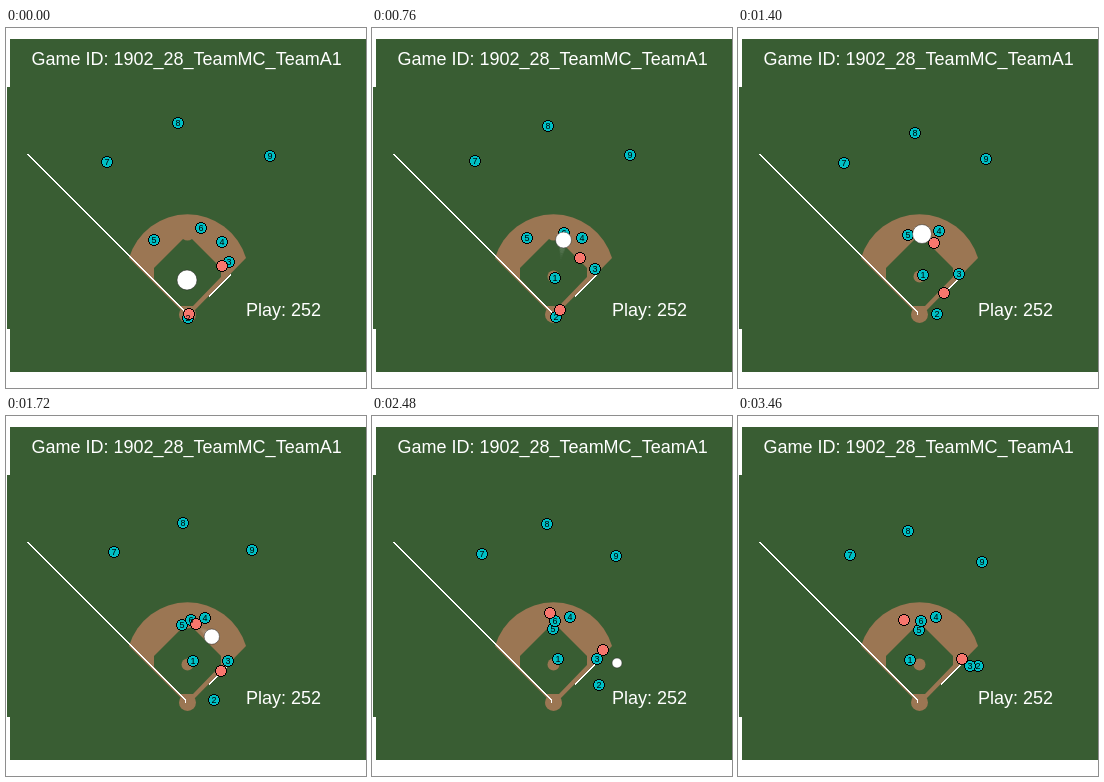
These frames come from a looping animation (360 by 360 pixels, 3480 ms). An HTML page:

```html
<!DOCTYPE html>
<html lang="en">
<head>
<meta charset="utf-8">
<title>Play 252</title>
<style>
  html, body { margin: 0; width: 100%; height: 100%; overflow: hidden; background: #fff; }
  svg { display: block; width: 100%; height: 100%; }
  text { font-family: "Liberation Sans", Arial, sans-serif; }
  .label { font-size: 18px; fill: #fff; }
  .num { font-size: 9px; text-anchor: middle; fill: #000; }
  .dot { stroke: #000; stroke-width: 1; shape-rendering: crispEdges; }
  .chalk { stroke: #fff; stroke-width: 1; fill: none; shape-rendering: crispEdges; }
</style>
</head>
<body>
<svg viewBox="0 0 360 360">
  <path fill="#395d33" d="M4 11H360V344H4V301H1V59H4Z"/>
  <g fill="#9b7653">
    <path d="M123 230A61 61 0 0 1 240 230L187 284H177Z"/>
    <path fill="#395d33" d="M148 240L177 211Q181.500 214 186 211L215 240V249L187 278H174L148 251Z"/>
    <circle cx="181.500" cy="248.500" r="6"/>
    <circle cx="181.500" cy="286.500" r="8.500"/>
  </g>
  <path class="chalk" d="M21.500 126L179 283.500V287M203 268.500L225 246.500"/>
  <g id="wake" fill="#fff"></g>
  <g id="dots"></g>
  <g id="nums"></g>
  <circle id="ball" fill="#fff" stroke="#222" stroke-width=".5"/>
  <text class="label" x="25.500" y="37">Game ID: 1902_28_TeamMC_TeamA1</text>
  <text class="label" x="240" y="288">Play: 252</text>
</svg>
<script>
const LOOP = 3480, STEP = 20, BALL_END = 3000, WAKE = 8;
const times = [0, 760, 1400, 2040, 2480, 2900, 3460];

// x,y at each time; a shorter track holds its last place
const tracks = {
  1: "181,250 183,250 185,247 188,244 186,243 180,244 172,244",
  2: "182,290 184,289 199,286 217,280 227,269 233,258 240,250",
  3: "223,234 223,241 221,246 223,244 225,243 230,246 232,250",
  4: "216,214 210,210 201,203 198,201",
  5: "148,212 155,210 170,207 180,211 181,213 181,214",
  6: "195,200 192,205 185,206 185,203 183,205 184,205 183,205",
  7: "101,134 103,133 106,135 109,137 110,138 111,138 112,139",
  8: "172,95 176,98 177,105 176,108 175,108 173,111 170,115",
  9: "264,128 258,127 248,131 245,137 244,140 244,143 244,146",
  runner: "216,238 208,230 196,215 185,202 178,197 172,198 166,204",
  batter: "183,286 188,282 206,265 223,245 231,234 230,235 224,243"
};

// time, x, y, radius
const flight = [
  [0, 181, 252, 10], [200, 181, 284, 7], [760, 191.5, 212, 8], [860, 192, 206, 8],
  [1400, 184, 206, 9.5], [1500, 185, 206, 9.5], [2040, 236, 242, 5],
  [2240, 253, 251, 4.5], [2480, 245, 247, 5], [2900, 235, 255, 3], [BALL_END, 236, 255, 3]
];

const $ = id => document.getElementById(id);

function add(parent, tag, cls) {
  const el = document.createElementNS("http://www.w3.org/2000/svg", tag);
  if (cls) el.setAttribute("class", cls);
  return parent.appendChild(el);
}

function set(el, attrs) {
  for (const k in attrs) el.setAttribute(k, attrs[k]);
}

const players = Object.entries(tracks).map(([name, track]) => {
  const keys = track.split(" ").map(p => p.split(",").map(Number));
  const fielder = name.length === 1;
  const dot = add($("dots"), "circle", "dot");
  set(dot, { r: 5.5, fill: fielder ? "#00bfc4" : "#f8766d" });
  const num = fielder ? add($("nums"), "text", "num") : null;
  if (num) num.textContent = name;
  return { keys, dot, num };
});

const ghosts = Array.from({ length: WAKE }, () => add($("wake"), "circle"));

function segment(list, t) {
  let i = 0;
  while (i < list.length - 2 && t >= list[i + 1]) i++;
  return i;
}

// smooth curve through the key places
function place(keys, t, axis) {
  const at = i => keys[Math.min(i, keys.length - 1)][axis];
  const last = times.length - 1;
  const slope = i => {
    const a = Math.max(i - 1, 0), b = Math.min(i + 1, last);
    return (at(b) - at(a)) / (times[b] - times[a]);
  };
  const i = segment(times, t), d = times[i + 1] - times[i];
  const u = Math.min((t - times[i]) / d, 1), v = 1 - u;
  return v * v * (1 + 2 * u) * at(i) + u * u * (3 - 2 * u) * at(i + 1)
    + d * u * v * (v * slope(i) - u * slope(i + 1));
}

function ballAt(t) {
  const i = segment(flight.map(k => k[0]), t);
  const a = flight[i], b = flight[i + 1];
  const u = (t - a[0]) / (b[0] - a[0]);
  return [1, 2, 3].map(n => a[n] + (b[n] - a[n]) * u);
}

function drawBall(el, t, scale, opacity) {
  const shown = t >= 0 && t < BALL_END;
  el.style.display = shown ? "" : "none";
  if (!shown) return;
  const [x, y, r] = ballAt(t);
  set(el, { cx: x, cy: y, r: r * scale, opacity });
}

function draw(t) {
  for (const { keys, dot, num } of players) {
    const x = Math.round(place(keys, t, 0)), y = Math.round(place(keys, t, 1));
    set(dot, { cx: x, cy: y });
    if (num) set(num, { x, y: y + 3 });
  }
  drawBall($("ball"), t, 1, 1);
  ghosts.forEach((g, i) => {
    const fade = 1 - (i + 1) / (WAKE + 1);
    drawBall(g, t - (i + 1) * STEP, fade * 0.6, fade * 0.12);
  });
}

const start = performance.now();
function tick() {
  const t = (performance.now() - start) % LOOP;
  draw(Math.floor(t / STEP) * STEP);
  requestAnimationFrame(tick);
}
draw(0);
requestAnimationFrame(tick);
</script>
</body>
</html>
```
